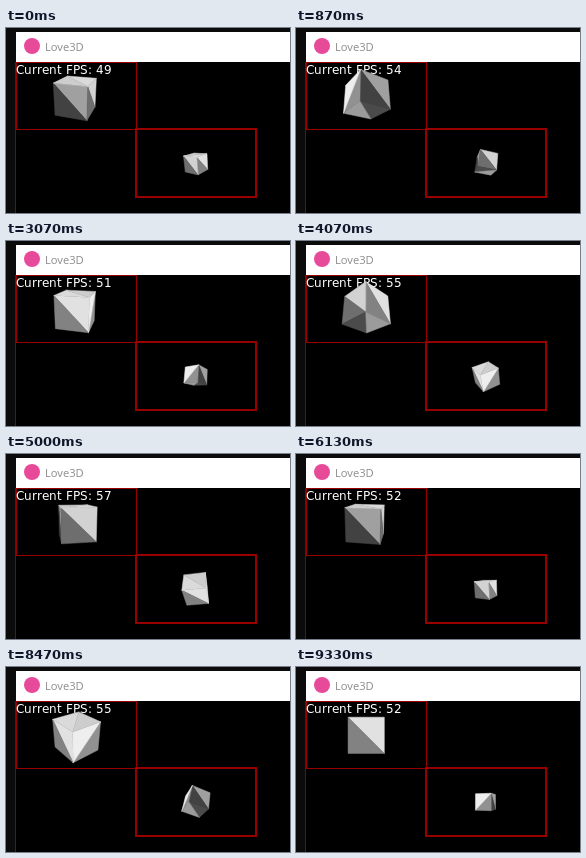
Write an HTML page with a canvas that moves like this. It is 284 px wide and 185 px high and loops after 9400 ms.

```html
<!DOCTYPE html>
<html lang="en">
<head>
<meta charset="utf-8">
<title>Love3D</title>
<style>
  html, body { margin: 0; width: 100%; height: 100%; overflow: hidden; background: #000; }
  canvas { display: block; width: 284px; height: 185px; }
</style>
</head>
<body>
<canvas id="stage" width="284" height="185"></canvas>
<script>
const ctx = document.getElementById('stage').getContext('2d');
const LOOP = 9400;
const FPS_READINGS = [49, 54, 55, 51, 55, 57, 52, 54, 55, 52];
const rad = degrees => degrees * Math.PI / 180;

// Corner bits: 1 = right, 2 = bottom, 4 = back. Each face has two flat grey triangles.
const FACES = [
  { quad: [0, 1, 3, 2], greys: [160, 66] },
  { quad: [0, 2, 6, 4], greys: [145, 238] },
  { quad: [5, 4, 6, 7], greys: [225, 130] },
  { quad: [1, 5, 7, 3], greys: [210, 110] },
  { quad: [4, 5, 1, 0], greys: [218, 205] },
  { quad: [2, 3, 7, 6], greys: [75, 155] }
];

const CORNERS = Array.from({ length: 8 }, (_, i) =>
  [1, 2, 4].map(bit => (i & bit ? 1 : -1)));

function turn(u, v, angle) {
  const c = Math.cos(angle), s = Math.sin(angle);
  return [u * c - v * s, u * s + v * c];
}

function rotate([x, y, z], { yaw, pitch, roll = 0 }) {
  [z, x] = turn(z, x, yaw);
  [y, z] = turn(y, z, pitch);
  [x, y] = turn(x, y, roll);
  return [x, y, z];
}

function triangle(a, b, c, grey) {
  const area = (b[0] - a[0]) * (c[1] - a[1]) - (b[1] - a[1]) * (c[0] - a[0]);
  if (area <= 0) return;
  ctx.beginPath();
  ctx.moveTo(...a);
  ctx.lineTo(...b);
  ctx.lineTo(...c);
  ctx.closePath();
  ctx.fillStyle = ctx.strokeStyle = `rgb(${grey},${grey},${grey})`;
  ctx.lineWidth = 0.5;
  ctx.fill();
  ctx.stroke();
}

function drawCube(cx, cy, focal, distance, pose) {
  const points = CORNERS.map(corner => {
    const [x, y, z] = rotate(corner, pose);
    const scale = focal / (distance + z);
    return [cx + x * scale, cy + y * scale];
  });
  for (const { quad, greys } of FACES) {
    const [a, b, c, d] = quad.map(i => points[i]);
    triangle(a, b, c, greys[0]);
    triangle(a, c, d, greys[1]);
  }
}

// Advances each glyph by whole pixels, as a bitmap text renderer does.
function pixelText(text, x, y) {
  for (const glyph of text) {
    ctx.fillText(glyph, x, y);
    x += Math.round(ctx.measureText(glyph).width);
  }
}

function drawWindow(seconds) {
  ctx.fillStyle = '#0b0b0b';
  ctx.fillRect(0, 0, 284, 185);
  ctx.fillStyle = '#000';
  ctx.fillRect(10, 34, 274, 151);
  ctx.fillStyle = '#2a2a2a';
  ctx.fillRect(9, 34, 1, 151);
  ctx.fillStyle = '#fff';
  ctx.fillRect(10, 4, 274, 30);

  ctx.fillStyle = '#e84a9a';
  ctx.beginPath();
  ctx.arc(26, 18, 8, 0, Math.PI * 2);
  ctx.fill();

  ctx.fillStyle = '#8c8c8c';
  ctx.font = '11.2px "Open Sans", sans-serif';
  ctx.fillText('Love3D', 39, 23);

  ctx.strokeStyle = '#980000';
  ctx.lineWidth = 1;
  ctx.strokeRect(10.5, 34.5, 120, 67);
  ctx.lineWidth = 2;
  ctx.strokeRect(130, 101, 120, 68);

  const reading = FPS_READINGS[Math.floor(seconds + 0.4)];
  ctx.fillStyle = '#fff';
  ctx.font = '12px "DejaVu Sans", sans-serif';
  pixelText(`Current FPS: ${reading}`, 10, 46);
}

function drawCubes(seconds) {
  const spin = rad(20 - 60 * seconds);
  const sway = Math.sin(spin);

  drawCube(70.2, 68.3, 145, 9, {
    yaw: spin,
    pitch: rad(31) * Math.sin(2 * spin)
  });

  const edge = 15.6 + 6.4 * sway * sway;
  drawCube(190, 135, edge * 6, 12, {
    yaw: spin + rad(110),
    pitch: rad(45) * sway,
    roll: rad(-13) * sway
  });
}

function render(now) {
  const step = Math.floor(((now % LOOP) + 3.5) * 15 / 1000);
  const seconds = (step % 141) / 15;
  drawWindow(seconds);
  drawCubes(seconds);
  requestAnimationFrame(render);
}

render(0);
</script>
</body>
</html>
```
